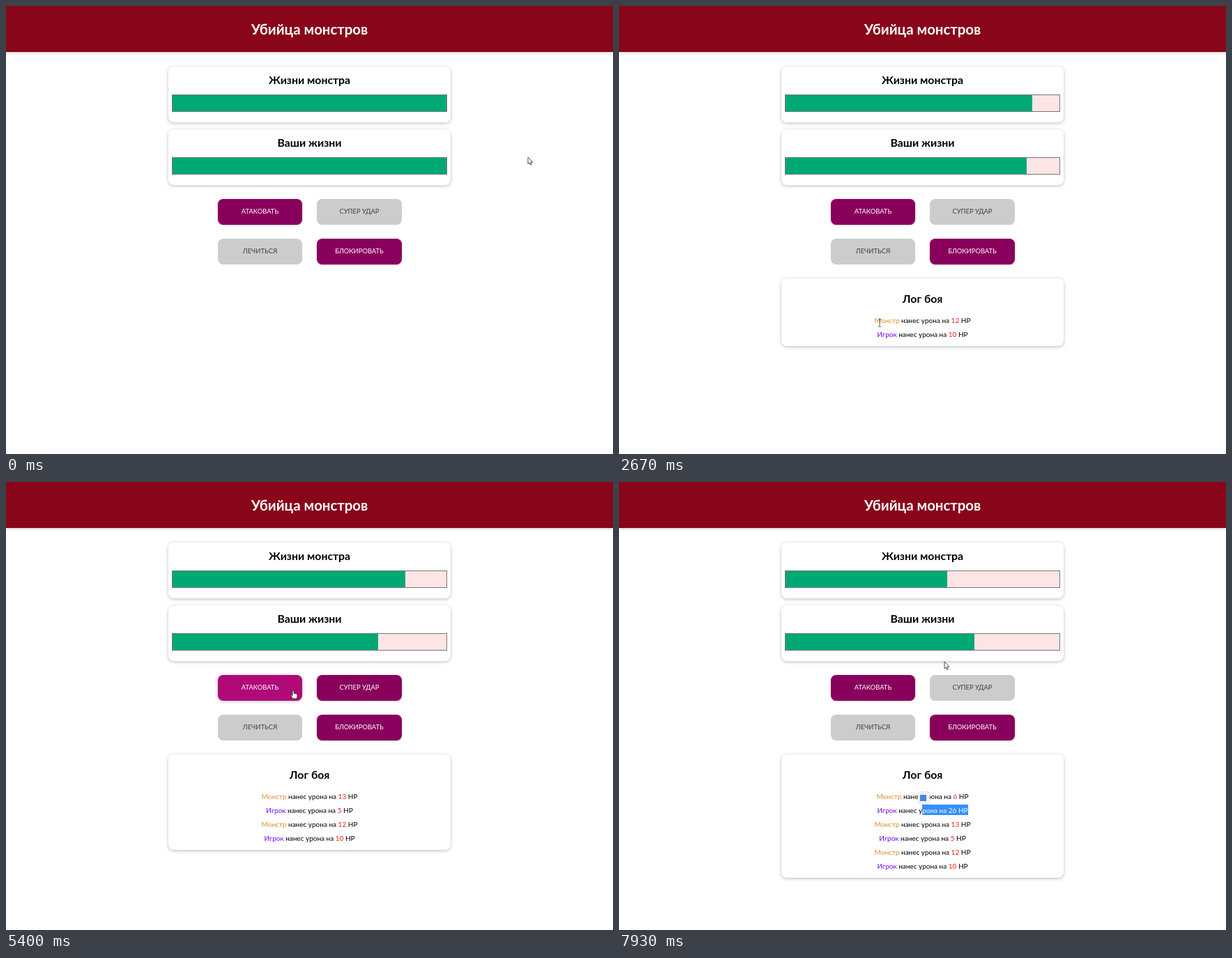
An HTML page for the animation above (8000 ms loop, 871 by 643 pixels).

```html
<!DOCTYPE html>
<html lang="ru">
<head>
<meta charset="utf-8">
<style>
  html, body { margin: 0; width: 100%; height: 100%; overflow: hidden; background: #fff; }
  body { position: relative; font: 10px/20px Lato, "Open Sans", sans-serif; color: #000; text-align: center; }
  header, section, h2, button, .bar, #rows, #popup, #cursor { position: absolute; box-sizing: border-box; margin: 0; }
  header { left: 0; top: 0; width: 871px; height: 66px; background: #89051a; color: #fff;
    font-size: 20.4px; font-weight: 700; line-height: 67px; box-shadow: 0 1.3px 5px rgba(0,0,0,.26); }
  section { left: 233px; width: 405px; height: 80px; border-radius: 7.6px; box-shadow: 0 1.3px 5px rgba(0,0,0,.26); }
  h2 { left: 0; width: 100%; top: 8.5px; font-size: 15.8px; line-height: 20px; }
  .bar { left: 5px; top: 40px; width: 395px; height: 25px; border: 1px solid #777; background: #fde5e5; }
  .bar div { height: 100%; background: #00a876; }
  button { width: 121.6px; height: 36.7px; padding: 0; border: 0; border-radius: 7.6px; background: #89005c;
    color: #fff; font: 9.4px/36.7px Lato, "Open Sans", sans-serif; box-shadow: 0 .6px 2.5px rgba(0,0,0,.26); }
  button.hover { background: #af0a78; box-shadow: 0 .6px 5px rgba(0,0,0,.26); }
  button:disabled { background: #ccc; color: #3f3f3f; box-shadow: none; }
  #log { top: 391px; }
  #log h2 { top: 19px; }
  #rows { left: 0; top: 50px; width: 100%; }
  .monster { color: #da8d30; }
  .player { color: #70f; }
  .damage { color: #f01818; }
  .selected { background: #3390ff; color: #fff; padding: 2px 0 1px; }
  .selected .damage { color: #fff; }
  #popup { left: 429px; top: 445px; width: 17px; height: 17px; border-radius: 2px; background: #f3f3f3;
    box-shadow: 0 0 2px rgba(0,0,0,.3); }
  #popup::after { content: ""; position: absolute; left: 3px; top: 4px; width: 9px; height: 9px; background: #4a84e0; }
  #cursor { left: 0; top: 0; overflow: visible; pointer-events: none; }
</style>
</head>
<body>
<header>Убийца монстров</header>
<section style="top:87px"><h2>Жизни монстра</h2><div class="bar"><div id="monsterBar"></div></div></section>
<section style="top:177px"><h2>Ваши жизни</h2><div class="bar"><div id="playerBar"></div></div></section>
<section id="log"><h2>Лог боя</h2><div id="rows"></div></section>
<div id="popup"></div>
<svg id="cursor" width="1" height="1" fill="#fff" stroke="#222" stroke-width=".8" stroke-linejoin="round">
  <path id="arrow" d="M0 0V9.8L2.3 7.7 3.8 11.2 5.3 10.5 3.9 7.2H6.9Z"/>
  <path id="hand" d="M-1 1a1 1 0 0 1 2 0V4.2l3.8.9q1.2.4 1.2 1.7v2.4l-1 2.8H-.4l-2.8-4.2q-.4-1 .6-1.3l1.6 1.2Z"/>
  <path id="beam" fill="none" stroke="#333" d="M-2.3-5.2H-.6L0-4.7.6-5.2H2.3M0-4.7V4.7M-2.3 5.2H-.6L0 4.7.6 5.2H2.3"/>
  <path id="denied" stroke="#d00c20" stroke-width="1.4" d="M-4 0a4 4 0 1 1 8 0a4 4 0 1 1-8 0M-2.8-2.8L2.8 2.8"/>
</svg>
<script>
const FPS = 15, FRAMES = 120, RELEASE = 114;
const BUTTON_W = 121.6, BUTTON_H = 36.7;
const TEXT_RIGHT = 501, CHAR_WIDTH = 5.1;
const $ = id => document.getElementById(id);

const rounds = [
  { tick: 17, hit: 10, hurt: 12 },
  { tick: 68, hit: 5, hurt: 13 },
  { tick: 88, hit: 26, hurt: 6 }
];

// Pointer moves: first tick, last tick, destination. It rests in between.
const START = { x: 749, y: 217 };
const moves = [
  [0, 11, 381, 291],     // to the attack button
  [24, 40, 374, 455],    // down to the log
  [40, 50, 508, 477],
  [52, 56, 521, 457],
  [57, 66, 386, 302],    // back to attack
  [79, 85, 486, 290],    // super attack
  [88, 100, 481, 457],
  [100, 106, 504, 471],
  [106, 110, 449, 471],  // drag a selection
  [113, RELEASE, 435, 470],
  [RELEASE, 119, 467, 258]
];

const buttons = ["АТАКОВАТЬ", "СУПЕР УДАР", "ЛЕЧИТЬСЯ", "БЛОКИРОВАТЬ"].map((label, i) => {
  const node = document.createElement("button");
  const x = 303.7 + 142.5 * (i % 2), y = 277.3 + 57 * (i >> 1);
  node.textContent = label;
  node.style.left = x + "px";
  node.style.top = y + "px";
  document.body.insertBefore(node, $("popup"));
  return { node, x, y };
});
const [, superAttack, heal] = buttons;
heal.node.disabled = true;

const inside = (p, x, y, w, h) => p.x >= x && p.x < x + w && p.y >= y && p.y < y + h;

function pointerAt(tick) {
  const p = { ...START };
  for (const [from, to, x, y] of moves) {
    const u = Math.min(1, Math.max(0, (tick - from) / (to - from)));
    const eased = u * u * (3 - 2 * u);
    p.x += (x - p.x) * eased;
    p.y += (y - p.y) * eased;
  }
  return p;
}

// Number of characters between the dragging pointer and the end of the line.
function selectedLength(tick) {
  if (tick < 106) return 0;
  const { x } = pointerAt(Math.min(tick, RELEASE));
  return Math.max(0, Math.round((TEXT_RIGHT - x) / CHAR_WIDTH));
}

function line(who, name, damage, selected = 0) {
  const text = ` нанес урона на ${damage} HP`;
  const cut = text.length - selected;
  const mark = part => part.replace(/\d+/, '<span class="damage">$&</span>');
  return `<span class="${who}">${name}</span>${mark(text.slice(0, cut))}` +
    `<span class="selected">${mark(text.slice(cut))}</span><br>`;
}

function render(tick) {
  const played = rounds.filter(round => round.tick <= tick);
  const health = key => 100 - played.reduce((sum, round) => sum + round[key], 0);
  $("monsterBar").style.width = health("hit") + "%";
  $("playerBar").style.width = health("hurt") + "%";

  $("log").hidden = !played.length;
  $("log").style.height = 57 + 40 * played.length + "px";
  $("rows").innerHTML = played.slice().reverse().map(({ hit, hurt }, i) =>
    line("monster", "Монстр", hurt) + line("player", "Игрок", hit, i ? 0 : selectedLength(tick))
  ).join("");
  $("popup").hidden = tick < RELEASE + 2;

  const p = pointerAt(tick);
  let shape = "arrow";
  superAttack.node.disabled = played.length !== 2;
  for (const { node, x, y } of buttons) {
    const over = inside(p, x, y, BUTTON_W, BUTTON_H);
    node.classList.toggle("hover", over && !node.disabled);
    if (over) shape = node.disabled ? "denied" : "hand";
  }
  const overText = inside(p, 366, 441, 136, 40 * played.length) && (p.y - 441) % 20 < 18;
  if (overText) shape = "beam";
  for (const path of $("cursor").children) path.style.display = path.id === shape ? "" : "none";
  $("cursor").style.transform = `translate(${Math.round(p.x)}px, ${Math.round(p.y)}px)`;
}

let shown = -1;
function loop() {
  const tick = Math.floor((performance.now() + 4) * FPS / 1000) % FRAMES;
  if (tick !== shown) render(shown = tick);
  requestAnimationFrame(loop);
}
loop();
</script>
</body>
</html>
```
